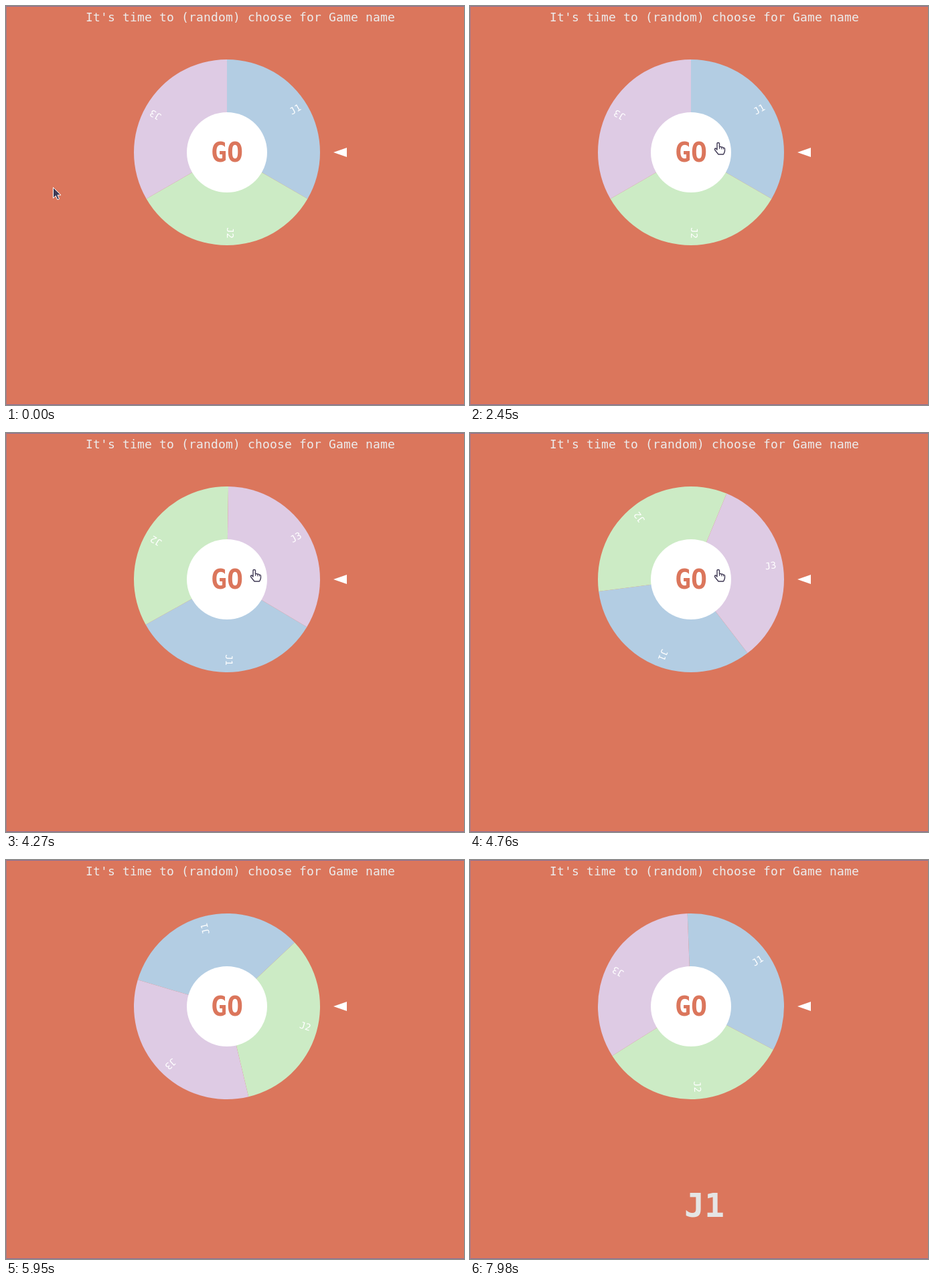
Write an HTML page that moves like this. It is 684 by 597 pixels and loops after 8000 ms.

```html
<!DOCTYPE html>
<html lang="en">
<head>
<meta charset="utf-8">
<title>Random wheel</title>
<style>
  html, body { margin: 0; width: 100%; height: 100%; overflow: hidden; background: #db765c; }
  svg { display: block; width: 684px; height: 597px; }
  text { font-family: "DejaVu Sans Mono", monospace; white-space: pre; }
  .title { font-size: 18px; letter-spacing: .164px; fill: #ececec; }
  .label { font-size: 14px; fill: #fff; text-anchor: end; }
  .go { font: bold 40px "DejaVu Sans Mono", monospace; fill: #db765c; text-anchor: middle; }
  .result { font: bold 50px "DejaVu Sans Mono", monospace; fill: #e5e5e5; text-anchor: middle; }
</style>
</head>
<body>
<svg viewBox="0 0 684 597">
  <rect width="684" height="597" fill="#db765c"/>
  <path d="M0 .5H684M0 596.5H684" stroke="#84739c"/>
  <path d="M.5 0V597" stroke="#ad7885"/>
  <text class="title" x="119" y="23">It's time to (random) choose for Game name</text>
  <g transform="translate(330 219)">
    <g id="wheel"></g>
    <circle r="60" fill="#fff"/>
    <text class="go" y="14">GO</text>
    <path d="M159 0L179-7V7Z" fill="#fff"/>
  </g>
  <text class="result" id="result" x="350" y="534">J1</text>
  <path id="arrow" d="M.5 .5V16.5L4.3 13L6.9 18.8L9.6 17.6L7 11.9H12Z" fill="#3f3a55" stroke="#fff"/>
  <g id="hand" fill="#fff" stroke="#403a55" stroke-width="1.4" stroke-linejoin="round">
    <path d="M-2 11V2Q-2 .5-.3 .5T1.5 2V7Q3.5 5.8 4.6 7.4Q6.3 6.5 7.2 8.2Q9.5 7.8 9.5 10V13Q9 15.5 7.5 18H0L-5.2 11.5Q-6.2 9.5-4.4 9Q-3.4 9-2 11Z"/>
    <path d="M1.5 7V10M4.6 7.4V10.4M7.2 8.2V10.6" fill="none" stroke-width="1"/>
  </g>
</svg>
<script>
const $ = id => document.getElementById(id);
const LOOP = 8000, STEP = 70, TURN = 1797.8;
const clamp = v => Math.min(1, Math.max(0, v));
const cubicInOut = p => p < .5 ? 4 * p ** 3 : 1 - 4 * (1 - p) ** 3;
const smooth = p => p * p * (3 - 2 * p);

$('wheel').innerHTML = ['#b3cde3', '#ccebc5', '#decbe4'].map((color, i) =>
  `<g transform="rotate(${i * 120})">
    <path d="M0 0V-139A139 139 0 0 1 120.38 69.5Z" fill="${color}"/>
    <text class="label" transform="rotate(-30) translate(129)">J${i + 1}</text>
  </g>`).join('');

// The spin runs marginally slower in its second half.
const spin = t => clamp(.5454 + (t - 5180) / (t < 5180 ? 3146 : 3210));

function pointer(t) {
  const a = smooth(clamp(t / 840)), b = clamp((t - 840) / 350), c = 1 - (1 - b) ** 2;
  return [70 + 283 * a + 18 * c, 271 - 49 * a - 18 * c];
}

function show(el, on) { el.style.display = on ? '' : 'none'; }

function draw(now) {
  const t = Math.floor(now % LOOP / STEP) * STEP;
  const p = spin(t), [x, y] = pointer(t);
  const overHub = Math.hypot(x - 330, y - 219) < 60, visible = t < 5600;
  $('wheel').setAttribute('transform', `rotate(${TURN * cubicInOut(p)})`);
  show($('result'), p === 1);
  show($('arrow'), visible && !overHub);
  show($('hand'), visible && overHub);
  for (const id of ['arrow', 'hand']) $(id).setAttribute('transform', `translate(${x} ${y})`);
}

const start = performance.now();
function tick() {
  draw(performance.now() - start);
  requestAnimationFrame(tick);
}
tick();
</script>
</body>
</html>
```
